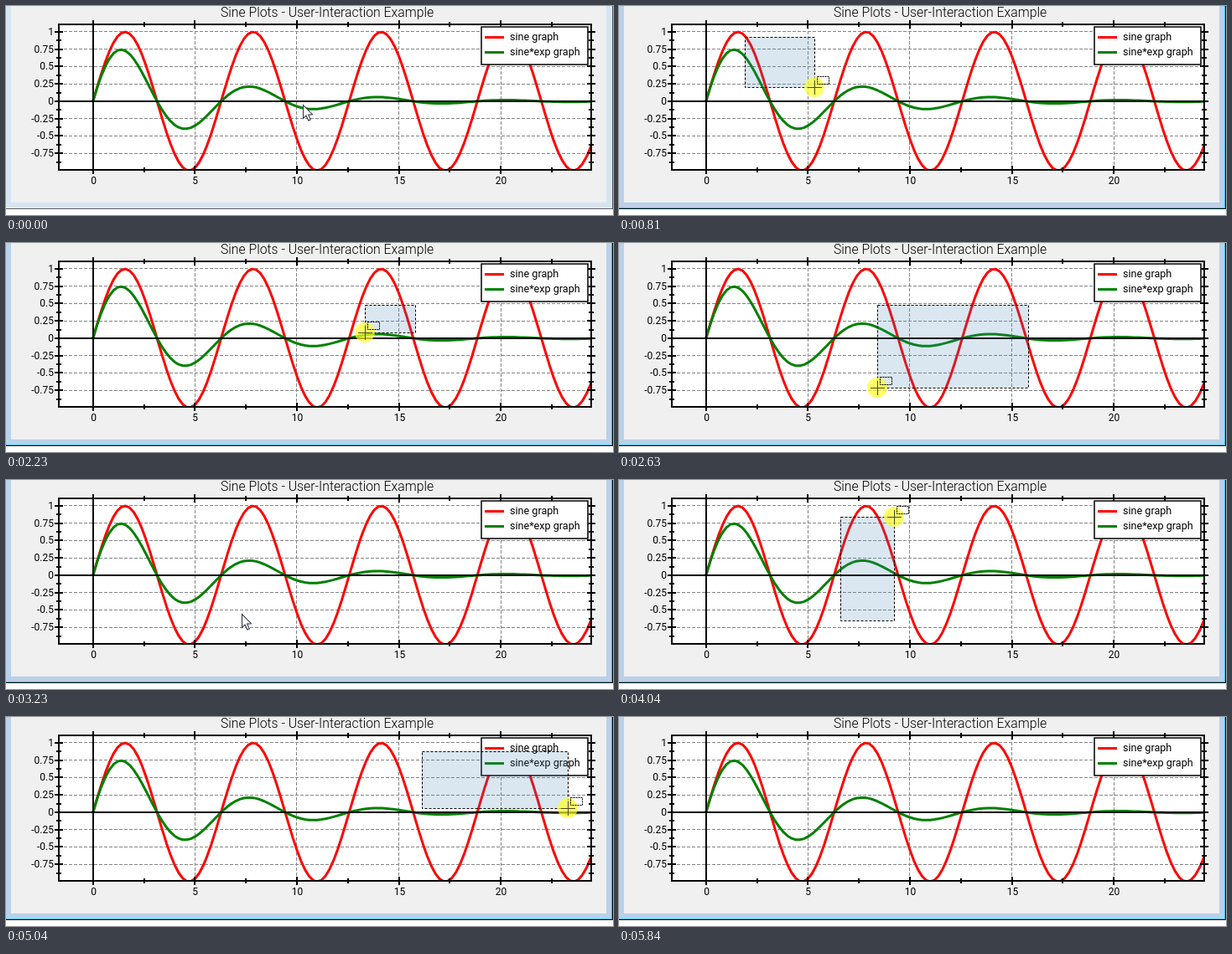
These frames come from a looping animation (724 by 250 pixels, 6250 ms). An HTML page with a canvas:

```html
<!DOCTYPE html>
<html>
<head>
<meta charset="utf-8">
<style>
html, body { margin: 0; width: 724px; height: 250px; overflow: hidden; background: #fff; }
canvas { display: block; }
</style>
</head>
<body>
<canvas width="724" height="250"></canvas>
<script>
const ctx = document.querySelector('canvas').getContext('2d');
const LOOP = 6250;
const BOX = { l: 63, t: 22, r: 698, b: 196 };
const FONT = 'Roboto, "Noto Sans", sans-serif';
const px = x => 103.75 + 24.32 * x;
const py = y => 113.95 - 82.96 * y;

// Pointer stops [step, x, y]: the pointer moves freely, then drags, in turn
const STOPS = [
  [0, 355, 118], [2, 150, 37], [6, 316, 157], [10, 488, 74], [13, 308, 173],
  [18, 264, 168], [20, 328, 44], [22, 496, 41], [25, 670, 109], [29, 679, 140]
];

function stepAt(t) {
  if (t < 200) return 0;
  const block = Math.floor((t - 200) / 1210);
  return 1 + 6 * block + Math.min(5, Math.floor((t - 200 - 1210 * block) / 200));
}

function pointerAt(n) {
  let i = STOPS.findLastIndex(s => s[0] <= n);
  if (i === STOPS.length - 1) return null;
  if (i > 0 && i % 2 === 0 && STOPS[i][0] === n) i--;
  const [n0, x0, y0] = STOPS[i], [n1, x1, y1] = STOPS[i + 1];
  const k = (n - n0) / (n1 - n0), drag = i % 2 === 1;
  // Free moves swing in an arc, drags are straight
  const bow = drag ? 0 : 0.233 * (x1 - x0) * Math.sin(Math.PI * k);
  return { x: Math.round(x0 + (x1 - x0) * k), y: Math.round(y0 + (y1 - y0) * k + bow), drag, x0, y0 };
}

function rect(x, y, w, h, color) {
  ctx.fillStyle = color;
  ctx.fillRect(x, y, w, h);
}

function line(x1, y1, x2, y2, color, width, dash = []) {
  ctx.strokeStyle = color;
  ctx.lineWidth = width;
  ctx.setLineDash(dash);
  ctx.beginPath();
  ctx.moveTo(x1, y1);
  ctx.lineTo(x2, y2);
  ctx.stroke();
  ctx.setLineDash([]);
}

function frame(x, y, w, h, width, dash = []) {
  ctx.strokeStyle = '#000';
  ctx.lineWidth = width;
  ctx.setLineDash(dash);
  ctx.strokeRect(x, y, w, h);
  ctx.setLineDash([]);
}

function text(s, x, y, size, align, weight = 400) {
  ctx.font = `${weight} ${size}px ${FONT}`;
  ctx.textAlign = align;
  ctx.fillStyle = '#000';
  ctx.fillText(s, x, y);
}

function curve(f, color) {
  ctx.strokeStyle = color;
  ctx.lineWidth = 3;
  ctx.lineJoin = 'round';
  ctx.beginPath();
  for (let x = 0; x < 24.8; x += 0.2) ctx.lineTo(px(x), py(f(x)));
  ctx.stroke();
}

function drawWindow(active) {
  rect(0, 0, 724, 243, active ? '#000' : '#565a60');
  rect(0, 0, 723, 242, active ? '#36c5ee' : '#e9f2fa');
  rect(0, 0, 722, 241, active ? '#b9d1ea' : '#d7e4f2');
  rect(6, 0, 710, 235, '#f0f0f0');
}

function drawTicks() {
  for (let i = 0; i < 10; i++) {
    const x = Math.round(px(i * 2.5)), major = i % 2 === 0, r = major ? 5 : 3;
    for (const y of [BOX.t, BOX.b]) line(x, y - r, x, y + r, '#000', 2);
    if (major) text(String(i * 2.5), x + 0.5, 213, 12, 'center');
  }
  for (let i = -7; i <= 8; i++) {
    const y = Math.round(py(i / 8)), major = i % 2 === 0, r = major ? 5 : 3;
    for (const x of [BOX.l, BOX.r]) line(x - r, y, x + r, y, '#000', 2);
    if (major) text(String(i / 8), 57, y + 4, 12, 'right');
  }
}

function drawPlot() {
  const { l, t, r, b } = BOX;
  text('Sine Plots - User-Interaction Example', 383, 13, 15.75, 'center', 300);
  rect(l, t, r - l, b - t, '#fff');
  for (let x = 5; x <= 20; x += 5) {
    const gx = Math.floor(px(x)) + 0.5;
    line(gx, b, gx, t, '#858585', 1, [4, 2]);
  }
  for (let y = -0.75; y <= 1; y += 0.25) {
    const gy = Math.floor(py(y)) + 0.5;
    line(l, gy, r, gy, '#858585', 1, [4, 2]);
  }
  ctx.save();
  ctx.beginPath();
  ctx.rect(l, t, r - l, b - t);
  ctx.clip();
  curve(Math.sin, '#f00');
  curve(x => Math.sin(x) * Math.exp(-0.2 * x), '#008000');
  ctx.restore();
  line(l, 114, r, 114, '#000', 2);
  line(104, t, 104, b, '#000', 2);
  frame(l, t, r - l, b - t, 2);
  drawTicks();
}

function drawLegend() {
  rect(567, 25, 127, 45, '#fff');
  frame(567, 25, 127, 45, 1.5);
  [['sine graph', '#f00'], ['sine*exp graph', '#008000']].forEach(([label, color], i) => {
    const y = 37.5 + 18 * i;
    line(571, y, 594, y, color, 3);
    text(label, 601, y + 3.5, 12.6, 'left');
  });
}

function drawSelection({ x, y, x0, y0 }) {
  const l = Math.min(x0, x), t = Math.min(y0, y);
  const w = Math.abs(x - x0), h = Math.abs(y - y0);
  rect(l, t, w, h, 'rgba(70,130,180,0.2)');
  if (w + h > 0) frame(l + 0.5, t + 0.5, w, h, 1, [3, 2]);
}

function drawCross({ x, y }) {
  ctx.fillStyle = 'rgba(255,255,40,0.7)';
  ctx.beginPath();
  ctx.arc(x, y, 12, 0, 7);
  ctx.fill();
  line(x - 8, y + 0.5, x + 9, y + 0.5, '#4a4a20', 1);
  line(x + 0.5, y - 8, x + 0.5, y + 9, '#4a4a20', 1);
  frame(x + 3.5, y - 12.5, 14, 9, 1, [2, 1]);
}

function drawArrow({ x, y }) {
  ctx.save();
  ctx.translate(x - 0.5, y + 0.5);
  const shape = new Path2D('M0 0V16L3.5 12.7 6.3 18.5 8.8 17.4 6.2 11.6 11 11.2Z');
  ctx.fillStyle = '#f8faff';
  ctx.fill(shape);
  ctx.strokeStyle = '#303848';
  ctx.lineWidth = 1.1;
  ctx.stroke(shape);
  ctx.restore();
}

function draw(t) {
  const n = stepAt(t), pointer = pointerAt(n);
  drawWindow(n > 0);
  drawPlot();
  drawLegend();
  if (!pointer) return;
  if (pointer.drag) {
    drawSelection(pointer);
    drawCross(pointer);
  } else {
    drawArrow(pointer);
  }
}

const start = performance.now();
function tick() {
  draw((performance.now() - start) % LOOP);
  requestAnimationFrame(tick);
}
tick();
</script>
</body>
</html>
```
